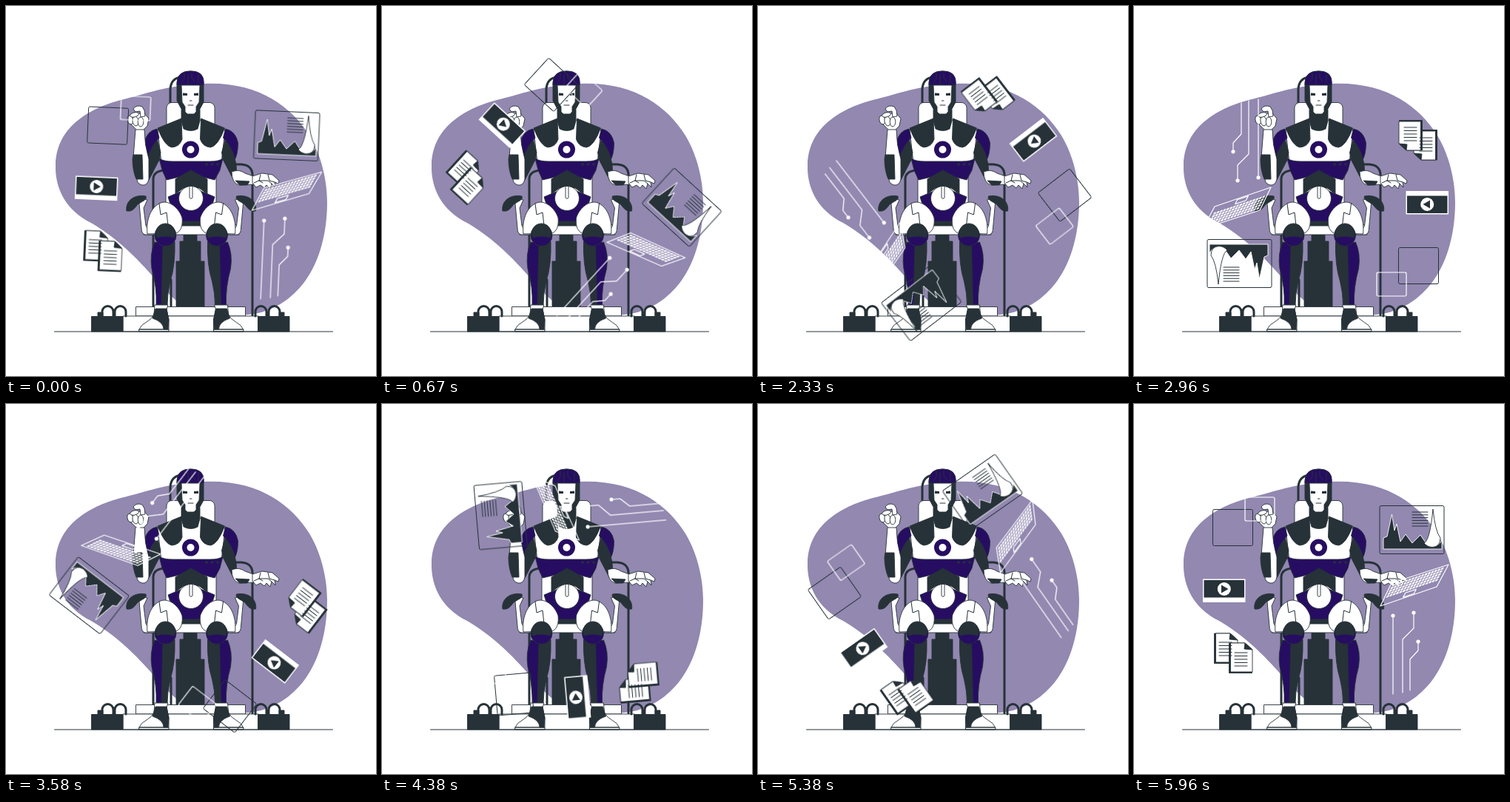
Write an HTML page that moves like this. It is 500 px wide and 500 px high and loops after 6 s.

```html
<!DOCTYPE html>
<html lang="en">
<head>
<meta charset="utf-8">
<title>Robot on a throne</title>
<style>
  html, body { margin: 0; width: 100%; height: 100%; overflow: hidden; background: #fff; }
  svg { display: block; width: 100vw; height: 100vh; }
  .w { fill: #fff; }
  .d { fill: #263238; }
  .p { fill: #260d62; }
  .w, .d, .p { stroke: #263238; stroke-width: .9; stroke-linejoin: round; }
  .n { stroke: none; }
  .l, .tube, .wl { fill: none; stroke: #263238; stroke-width: 1; stroke-linecap: round; stroke-linejoin: round; }
  .tube { stroke-width: 3; }
  .wl { stroke: #fff; stroke-width: 1.2; }
  #orbit { transform-origin: 259px 259px; }
</style>
</head>
<body>
<svg viewBox="0 0 500 500">
  <path fill="#9288b0" d="M67 215C68 165 110 139 155 127C190 119 215 107 268 105C340 102 385 135 410 175C428 205 434 240 434 265C434 330 409 395 345 414Q325 419 300 418C255 418 235 405 215 384C185 350 160 320 115 293C80 276 66 245 67 215Z"/>

  <g id="throne">
    <path class="tube" d="M199 406V233Q200 223 214 222M333 418V227Q332 215 318 214H300M223 370V406M222 142V112Q223 98 236 96"/>
    <rect class="w" x="217" y="130.500" width="65" height="60" rx="7"/>
    <rect class="w" x="216" y="215" width="68" height="85"/>
    <path class="d" d="M240 309H258V318H263V345H268V406H230V345H235V318H240Z"/>
    <rect class="w" x="186" y="296" width="129" height="13"/>
    <rect class="w" x="175.500" y="406.500" width="148" height="12.500"/>
    <rect class="w" x="158" y="419" width="183" height="21"/>
    <path class="l" d="M65.500 440H441.500"/>
    <path class="d" d="M115.500 419.500H158V440H115.500ZM124 414H131V419H124ZM340.500 419.500H383V440H340.500ZM369 414H376V419H369Z"/>
    <path class="tube" d="M130 419V413A7.500 7.500 0 0 1 145 413V419M147 419V413A7.500 7.500 0 0 1 162 413V419M337 419V413A7.500 7.500 0 0 1 352 413V419M355 419V413A7.500 7.500 0 0 1 370 413V419"/>
  </g>

  <g id="torso">
    <path class="p" d="M219 258L238 250H263L282 258L272 290Q250 296 229 290Z"/>
    <path class="d" d="M238 291H263V297H238ZM229 234L250 221L272 234V254L261 246H240L229 254Z"/>
    <path class="w" d="M205 168L238 154L250 166L262 154L296 168L291 212H210Z"/>
    <path class="p" d="M207 206Q213 210 225 210H276Q288 210 293 206L289 222L282 235L266 231L250 222L234 231L217 235L211 222Z"/>
    <path class="d" d="M237 140H262V155L259 166Q250 171 240 166L237 155Z"/>
    <circle class="p n" cx="249.500" cy="194" r="11.500"/>
    <circle class="w n" cx="249.500" cy="194" r="5"/>
    <g class="d n"><circle cx="271" cy="214" r="1.800"/><circle cx="278.500" cy="214" r="1.800"/><circle cx="286" cy="214" r="1.800"/></g>
    <circle class="w" cx="250" cy="260" r="16.500"/>
    <path class="w" d="M248 243.500H252V259Q250 262 248 259Z"/>
  </g>

  <g id="half">
    <path class="d" d="M205 165L237 152L238 180Q235 190 224 191Q214 189 205 165Z"/>
    <path class="d" d="M204 180L209 198L207 208L193 235L189 225Q188 203 204 180Z"/>
    <path class="p" d="M204 166Q190 169 187 185Q187 199 191 207Q195 191 207 178Z"/>
    <path class="w" d="M180 267Q184 259 191 262L186 273L189 297Q191 303 200 303V309H188Q183 308 183 300Z"/>
    <path class="d" d="M163 277C161 263 174 254 189 257C191 262 184 264 178 268C173 274 171 278 163 277Z"/>
    <path class="w" d="M191 308C189 290 195 272 209 266C220 262 233 272 238 286C239 296 237 304 230 307Z"/>
    <path class="l" d="M207 267L209 282L217 279L219 297"/>
    <path class="p" d="M201 319L216 322L211 404H203Q204 380 197 355Q194 335 201 319Z"/>
    <path class="d" d="M212 322L228 318Q229 350 222 372Q218 388 218 404H210Z"/>
    <circle class="p" cx="215.500" cy="310" r="14.500"/>
    <path class="d" d="M204 313A13 13 0 1 1 227 313Q215 309 204 313Z"/>
    <path class="w" d="M201 404H219L217 410L220 424V437H180Q182 431 190 427Q197 423 200 417Z"/>
    <path class="d" d="M202 409H217L220 424L219 437H213Q213 427 198 422Z"/>
    <path class="l" d="M180 437H220V440H180Z"/>
  </g>
  <use href="#half" transform="matrix(-1 0 0 1 500.500 0)"/>

  <g id="arms">
    <path class="w" d="M175 167Q181 164 187 167Q187 187 193 207L193 234Q191 243 184 242Q177 240 177 234L172 205Z"/>
    <path class="d" d="M172 201H184L185 234H176Q171 222 171 207Z"/>
    <path class="w" d="M171 147L186 144L193 152L191 162L186 167H176L169 160Z"/>
    <path class="w" d="M172 139Q176 133 184 136L187 141L188 149L182 150L181 142L175 143Z"/>
    <ellipse class="w" cx="168" cy="154" rx="4" ry="6" transform="rotate(-15 168 154)"/>
    <ellipse class="w" cx="175" cy="155.500" rx="4" ry="6.500" transform="rotate(-10 175 155.500)"/>
    <ellipse class="w" cx="182" cy="156.500" rx="3.800" ry="6.500"/>
    <ellipse class="w" cx="173.500" cy="147" rx="6" ry="3" transform="rotate(-15 173.500 147)"/>
    <path class="w" d="M305 224Q315 220 323 226L337 231L335 241L315 242Q305 239 305 224Z"/>
    <path class="d" d="M310 236L329 237L326 242H316Z"/>
    <path class="w" d="M333 230L346 226L360 228L369 236L368 240L363 238L364 245L359 240L357 247L352 242L349 246L344 242L338 245L333 239Z"/>
    <path class="l" d="M344 228L342 236L347 239M342 236H354L359 240M354 228L356 236L363 238M335 239L342 236"/>
  </g>

  <g id="head">
    <path class="d" d="M231 105Q231 88 249.500 88Q268 88 267 105V130L261 141L256 148H243L238 141L231 128Z"/>
    <path class="p" d="M231 107Q230 88 249.500 88Q269 88 267 107Z"/>
    <path class="l" d="M241 91V98L237 104M246 93V106M251 91V97L255 102M260 93V104"/>
    <path class="w" d="M237 107H262L261 130L257 136V143L254 146H245L242 143V136L238 130Z"/>
    <path class="d n" d="M239 117.500L245 118V121H239ZM260 117.500L254 118V121H260Z"/>
    <path class="l" d="M248.500 128H251M246 134H253"/>
  </g>

  <g id="orbit">
    <rect class="l" x="106.500" y="142.500" width="54" height="49" rx="2"/>
    <rect class="wl" x="150" y="126" width="40" height="32" rx="2"/>

    <rect class="w n" x="93" y="236.500" width="57.500" height="31.500"/>
    <rect class="d n" x="94.500" y="238" width="54.500" height="23.500"/>
    <circle class="w n" cx="121.800" cy="250" r="9"/>
    <path class="d n" d="M118 244.500V255.500L127.500 250Z"/>

    <g id="chart">
      <rect class="l" x="332" y="137.500" width="87" height="65" rx="2"/>
      <path class="d" style="stroke:#fff" d="M337 196V181L342 179L348.500 149L352 171L355 162L360 186L367 176L376 188L387 177L396 190L402 191Q410 195 416 184V196Z"/>
      <path class="w" d="M392 188Q400 184 404 142Q407 172 414 181Q414 193 403 193.500Q396 193 392 188Z"/>
    </g>

    <g id="page">
      <path class="d" d="M108.500 310H130L139.500 319V350.500H108.500Z"/>
      <path class="w" d="M110.500 310H130L140 319V349H110.500Z"/>
      <path class="d" d="M130 310L140 319L129 318Z"/>
    </g>
    <use href="#page" x="20" y="13"/>

    <path class="wl" d="M348 242L425 217L409 247L333 273Z"/>
    <path class="wl" d="M350 286V392M378 282V303L363 318V390M384 321V333L373 345V387"/>
    <g class="w n"><circle cx="350" cy="286" r="2.600"/><circle cx="378" cy="282" r="2.600"/><circle cx="384" cy="321" r="2.600"/></g>
  </g>
</svg>
<script>
  const orbit = document.getElementById('orbit');

  function addPath(d, cls) {
    const path = document.createElementNS('http://www.w3.org/2000/svg', 'path');
    path.setAttribute('d', d);
    path.setAttribute('class', cls);
    orbit.append(path);
  }

  function textLines(x, y, width, count, gap) {
    let d = '';
    for (let i = 0; i < count; i++) d += `M${x} ${y + i * gap}h${width}`;
    addPath(d, 'l');
  }

  // Point on the slanted keyboard: u along a row, v from back to front.
  const keyPoint = (u, v) =>
    `${(348 + 76.5 * u - 15.5 * v).toFixed(1)} ${(242 - 25.5 * u + 30.5 * v).toFixed(1)}`;

  const keyQuad = (u, v, w, h) =>
    `M${keyPoint(u, v)}L${keyPoint(u + w, v)}L${keyPoint(u + w, v + h)}L${keyPoint(u, v + h)}Z`;

  let keys = '';
  for (let row = 0; row < 5; row++)
    for (let col = 0; col < 16; col++)
      keys += keyQuad(0.04 + col * 0.0575, 0.09 + row * 0.125, 0.043, 0.095);

  addPath(keys, 'w n');
  addPath(keyQuad(0.4, 0.77, 0.19, 0.19), 'wl');

  textLines(376, 146, 21, 6, 3.8);
  textLines(115, 322, 17, 5, 4.5);
  textLines(136, 336, 17, 5, 4.5);

  // One clockwise turn in 2.5 degree ticks.
  orbit.animate(
    [{ transform: 'rotate(0deg)' }, { transform: 'rotate(360deg)' }],
    { duration: 6000, delay: -5, iterations: Infinity, easing: 'steps(144, start)' }
  );
</script>
</body>
</html>
```
